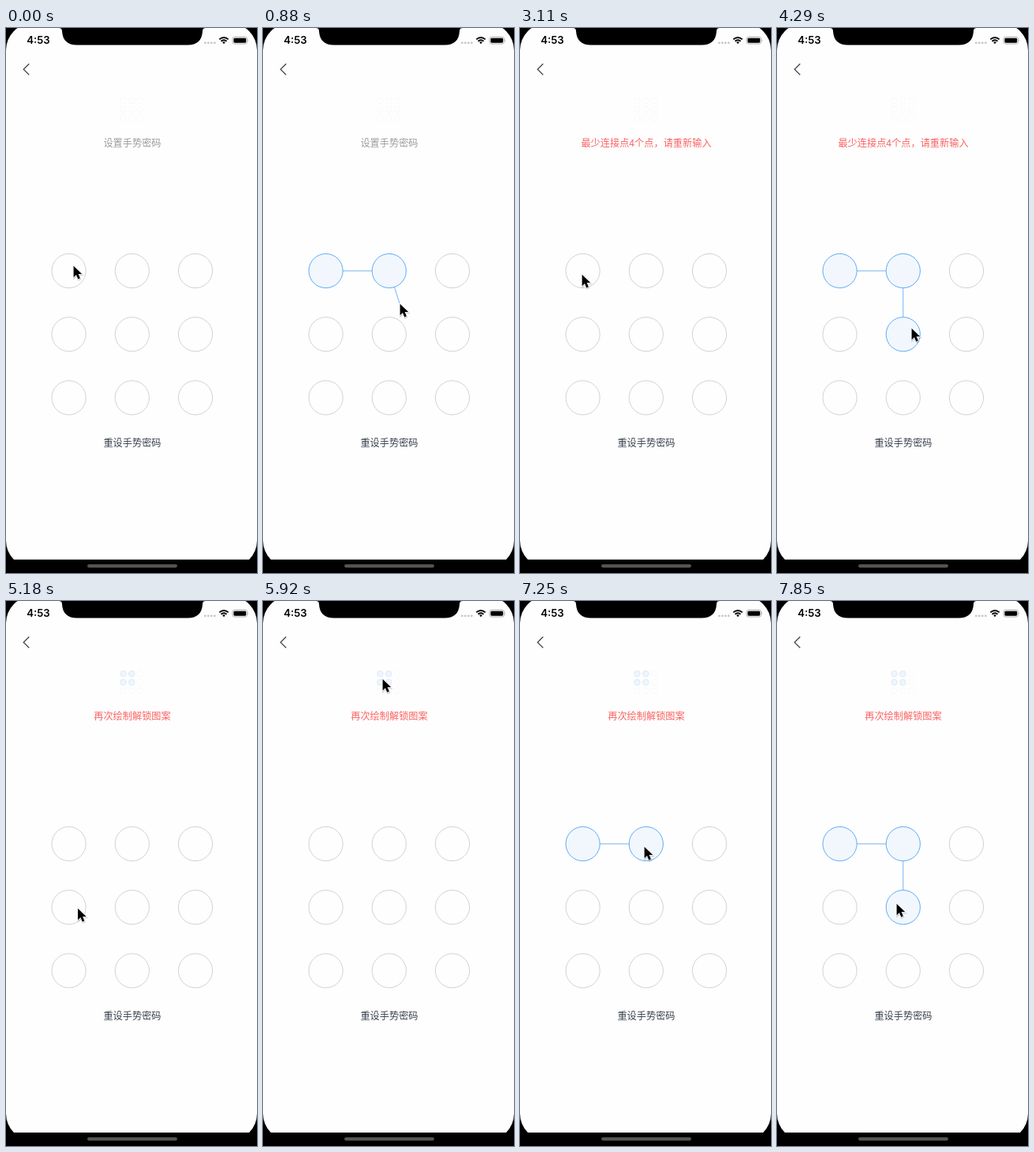
Recreate the animation shown at these times as an HTML page. Size 318x689 px, loop 7990 ms.

```html
<!DOCTYPE html>
<html lang="zh-CN">
<head>
<meta charset="utf-8">
<title>手势密码</title>
<style>
  html, body { margin: 0; width: 100%; height: 100%; overflow: hidden; background: #000; }
  svg { display: block; width: 100vw; height: 100vh; }
  text { font: 12.2px "Noto Sans CJK SC", "Noto Sans CJK", sans-serif; text-anchor: middle; }
  .clock { font: 600 13.2px Inter, "Liberation Sans", sans-serif; }
  .node { fill: #fefefe; stroke: #d2d2d2; }
  .node.on { fill: #f2f7fd; stroke: #5eacf7; }
  .node.bad { fill: #feeeee; stroke: #f96c6c; }
  .mini { fill: none; stroke: #fafafa; }
  .mini.on { fill: #eff6fd; stroke: #d9eafa; }
  #trail { fill: none; stroke: #74b3f2; }
  #trail.bad { stroke: #a3a9d2; }
</style>
</head>
<body>
<svg viewBox="0 0 318 689" preserveAspectRatio="none">
  <rect width="318" height="689"/>
  <rect y="-6" width="318" height="688" rx="34" fill="#fefefe"/>
  <path d="M67 0Q71 0 71 4Q72 21.5 90 21.5H230Q248 21.5 249 4Q249 0 253 0Z"/>
  <rect y="672" width="318" height="17"/>
  <rect x="103" y="678" width="114" height="4.2" rx="2.1" fill="#545454"/>

  <text class="clock" x="41" y="20.3">4:53</text>
  <g fill="#c4c4c4">
    <circle cx="252.3" cy="18.8" r="1.4"/><circle cx="256.3" cy="18.8" r="1.4"/>
    <circle cx="260.3" cy="18.8" r="1.4"/><circle cx="264.3" cy="18.8" r="1.4"/>
  </g>
  <g fill="none" stroke="#000" stroke-width="1.9">
    <path d="M270.3 14.4Q276 9.4 281.7 14.4M272.5 16.8Q276 13.7 279.5 16.8"/>
    <path d="M274.2 18L276 20.2L277.8 18Q276 16.6 274.2 18Z" fill="#000" stroke="none"/>
  </g>
  <rect x="287" y="11.3" width="18.6" height="8.8" rx="2.6" fill="none" stroke="#aaa" stroke-width=".9"/>
  <rect x="288.4" y="12.7" width="15.8" height="6" rx="1.4"/>
  <path d="M306.7 14.2Q308.3 15.7 306.7 17.2Z" fill="#aaa"/>

  <path d="M29.3 45.2L22.2 52.2L29.3 59.2" fill="none" stroke="#39404a" stroke-width="1.2"/>
  <g id="minis"></g>
  <text id="hint" y="149.7"></text>
  <path id="trail"/>
  <g id="nodes"></g>
  <text x="160" y="529.4" fill="#39414d">重设手势密码</text>
  <g id="cursor">
    <path d="M0 0V14.4L3.4 11.3L5.7 16.6L8.3 15.5L6 10.3H10.6Z" transform="translate(.5 1.4)" fill="#000" opacity=".16" stroke="#000" stroke-width="1.6"/>
    <path d="M0 0V14.4L3.4 11.3L5.7 16.6L8.3 15.5L6 10.3H10.6Z" stroke="#fff" stroke-width="1.1" stroke-linejoin="round" paint-order="stroke"/>
  </g>
</svg>
<script>
const LOOP = 7990, TICKS = 54;
const $ = id => document.getElementById(id);

// Pointer moves: first tick, then one x,y pair per tick; it rests in between.
const moves = [
  [0, 85,300, 93,304, 132,304, 178,306],
  [5, 177,322, 173,348, 169,376, 166,396],
  [17, 158,390, 130,361, 99,329, 82,314, 78,311],
  [23, 82,309, 128,306, 169,307],
  [28, 169,346, 170,379, 150,385, 118,388, 90.5,388],
  [37, 95,361, 114,262, 139,160, 151,98, 160,95, 155,110, 141,160, 119,237],
  [45, 100,271, 84,297, 87,306, 128,306, 157,310],
  [51, 156,341, 153,372, 151,382]
];

// Each hit is [tick, node].
const strokes = [
  { end: 21, bad: 14, hits: [[1, 0], [3, 1], [7, 4]] },
  { end: 35, hits: [[23, 0], [25, 1], [29, 4], [31, 3]] },
  { end: 54, hits: [[47, 0], [49, 1], [52, 4]] }
];

const hints = [
  [0, '设置手势密码', '#9b9b9b'],
  [14, '最少连接点4个点，请重新输入', '#fb6262'],
  [35, '再次绘制解锁图案', '#fb6262']
];
const shake = { 14: 1, 15: -1, 16: 1 };

const spot = i => [79.6 + i % 3 * 80.2, 307 + Math.floor(i / 3) * 80.2];

function grid(parent, name, r, place) {
  return Array.from({ length: 9 }, (_, i) => {
    const c = document.createElementNS('http://www.w3.org/2000/svg', 'circle');
    const [x, y] = place(i);
    for (const [k, v] of Object.entries({ cx: x, cy: y, r, class: name })) c.setAttribute(k, v);
    return parent.appendChild(c);
  });
}
const nodes = grid($('nodes'), 'node', 21.6, spot);
const minis = grid($('minis'), 'mini', 3.7, i => [148.5 + i % 3 * 10.8, 92 + Math.floor(i / 3) * 10.8]);

const latest = (list, tick) => list.filter(e => e[0] <= tick).pop();

function pointer(tick) {
  const [start, ...xy] = latest(moves, tick);
  const i = Math.min(tick - start, xy.length / 2 - 1);
  return [xy[2 * i], xy[2 * i + 1]];
}

function draw(tick) {
  const at = pointer(tick);
  $('cursor').setAttribute('transform', `translate(${at[0] + .6} ${at[1] + .8})`);

  const stroke = strokes.find(s => tick < s.end);
  const hit = stroke.hits.filter(h => h[0] <= tick).map(h => h[1]);
  const bad = tick >= stroke.bad;
  nodes.forEach((n, i) => n.setAttribute('class', 'node' + (hit.includes(i) ? bad ? ' bad' : ' on' : '')));

  const points = hit.map(spot);
  if (hit.length && !bad) points.push(at);
  $('trail').setAttribute('d', points.length ? 'M' + points.join('L') : '');
  $('trail').setAttribute('class', bad ? 'bad' : '');

  const saved = tick >= 35 ? strokes[1].hits.map(h => h[1]) : [];
  minis.forEach((m, i) => m.setAttribute('class', saved.includes(i) ? 'mini on' : 'mini'));

  const [, words, color] = latest(hints, tick);
  const hint = $('hint');
  hint.textContent = words;
  hint.setAttribute('fill', color);
  hint.setAttribute('x', 160 + (shake[tick] || 0));
}

const began = performance.now();
let shown = -1;
function frame() {
  const t = (performance.now() - began) % LOOP;
  // A small lead keeps each change on its rounded start time.
  const tick = Math.min(TICKS - 1, Math.floor(t / LOOP * TICKS + .05));
  if (tick !== shown) draw(shown = tick);
  requestAnimationFrame(frame);
}
frame();
</script>
</body>
</html>
```
